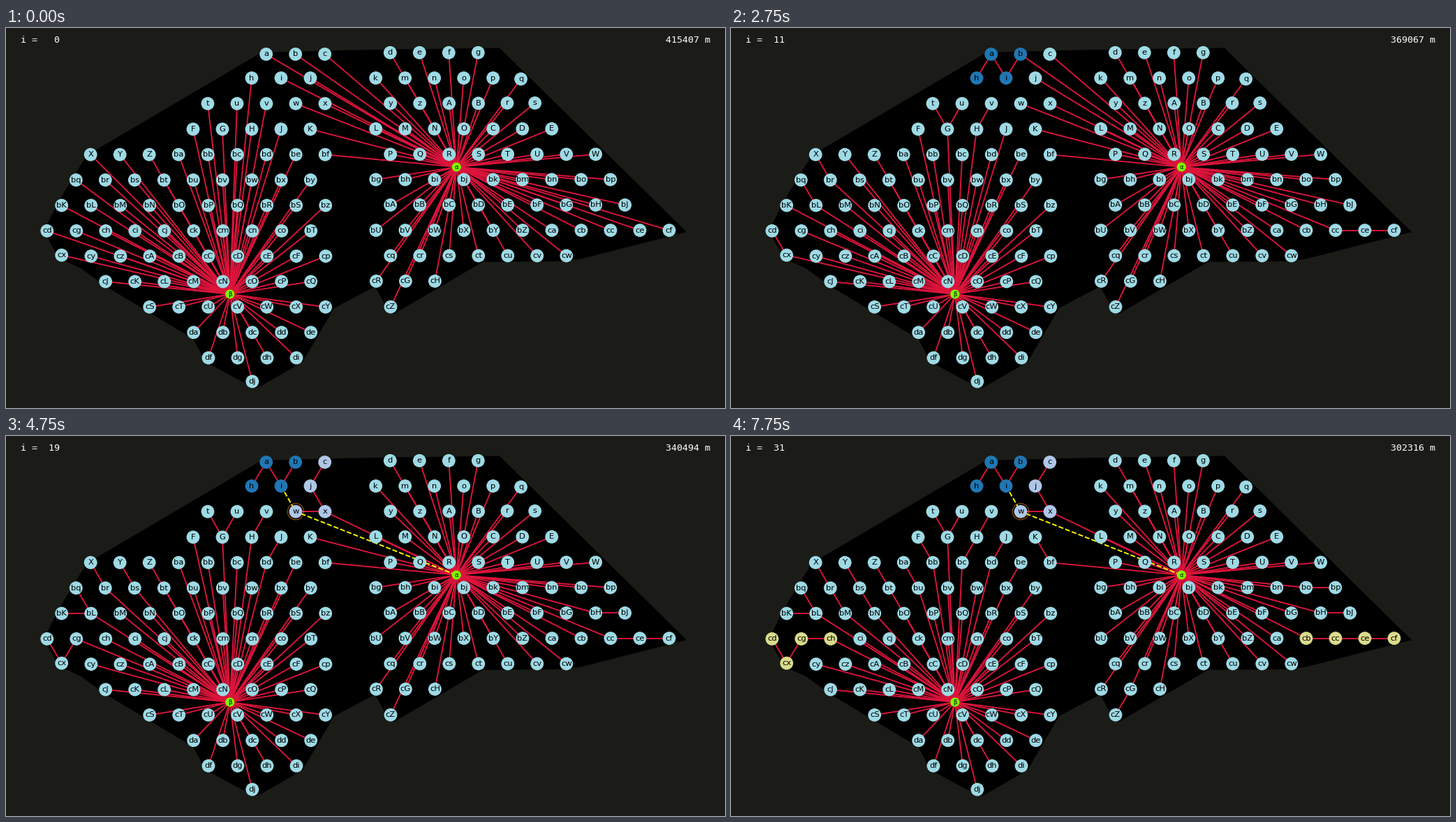
Recreate the animation shown at these times as a matplotlib script. Size 1030 px wide and 544 px high, loop 8000 ms.

```python
import math
import matplotlib.pyplot as plt
from matplotlib.animation import FuncAnimation
from matplotlib.collections import EllipseCollection, LineCollection

W, H, DPI = 1030, 544, 100
PX = 72 / DPI          # one pixel in points
STEPS, STEP_MS = 32, 250
START_LENGTH = 415407
CAPACITY = 4
PITCH = 42

# first x, y, labels of evenly spaced turbines
ROWS = [
    (372.7, 37.5, "a b c"), (550.3, 35.3, "d e f g"),
    (352, 71.6, "h i j"), (529.7, 71.6, "k m n o p"), (737.6, 73, "q"),
    (289, 108.2, "t u v w x"), (550.7, 107.8, "y z A B"),
    (718, 107.4, "r"), (757.7, 107.4, "s"),
    (268, 144.8, "F G H J K"), (529.8, 144.4, "L M N O C D E"),
    (121.2, 181.2, "X Y Z ba bb bc bd be bf"),
    (550.7, 180.8, "P Q R S T U V W"),
    (100.3, 217.6, "bq br bs bt bu bv bw bx by"),
    (529.8, 217, "bg bh bi bj bk bm bn bo bp"),
    (79.7, 254, "bK bL bM bN bO bP bQ bR bS bz"),
    (550.7, 253.4, "bA bB bC bD bE bF bG bH bJ"),
    (58.8, 290.4, "cd cg ch ci cj ck cm cn co bT"),
    (530, 289.6, "bU bV bW bX bY bZ ca cb cc ce cf"),
    (79.7, 325.2, "cx"), (121.9, 326.6, "cy cz cA cB cC cD cE cF cp"),
    (550.8, 326, "cq cr cs ct cu cv cw"),
    (142.7, 363, "cJ cK cL cM cN cO cP cQ"), (530.4, 362.4, "cR cG cH"),
    (205.7, 399.4, "cS cT cU cV cW cX cY"), (551, 399.2, "cZ"),
    (268.7, 435.8, "da db dc dd de"), (290, 472.2, "df dg dh di"),
    (352.8, 506, "dj"),
]
ROOTS = {"α": (645.3, 199), "β": (320.8, 381)}

# which turbine drops its feeder, where it connects, metres saved
MERGES = [m.split() for m in """
a i 4734; cf ce 4700; h a 4649; i b 4136; X br 4119; cd cx 4043;
ce cc 4030; v H 4028; bq bL 3976; t G 3976; u G 3949;
bK bL 3940; Y bs 3646; c j 3512; cx cg 3535; w x 3518;
J bd 3515; bJ bH 3510; j x 3397; F bb 3428; br bM 3423; cc cb 3355;
cg ch 3359; H bc 3355; Z bt 3230; cZ cG 3068;
be bx 3066; bp bo 3057; K bf 2982; ba bu 2933; bs bN 2922""".split(";")]

# first step of each detour and its path
DETOURS = [(14, "b j α"), (19, "i w α")]

OPEN_COLOR = "#9edae5"
FULL_COLORS = {"b": "#1f77b4", "x": "#aec7e8", "cb": "#dbdb8d", "ch": "#dbdb8d"}

BORDER = [(366, 35), (500, 31.5), (707, 28.5), (975, 292), (822, 331),
          (795, 334), (683, 335), (556, 409), (548, 406), (529, 370),
          (470, 401), (425, 478), (361, 515), (352, 514), (286, 478),
          (268, 445), (143, 370), (107, 344), (76, 330), (54, 291),
          (75, 249), (96, 214), (116, 182)]

pos = {}
for x0, y0, names in ROWS:
    for k, name in enumerate(names.split()):
        pos[name] = (x0 + PITCH * k, y0)
turbines = list(pos)
pos.update(ROOTS)


def nearest_root(name):
    return min(ROOTS, key=lambda r: math.dist(pos[name], pos[r]))


def network(step):
    """Parent of every turbine after the given number of merges."""
    parent = {t: nearest_root(t) for t in turbines}
    for child, to, _ in MERGES[:step]:
        parent[child] = to
    return parent


def head(name, parent):
    while parent[name] not in ROOTS:
        name = parent[name]
    return name


fig = plt.figure(figsize=(W / DPI, H / DPI), dpi=DPI, facecolor="#1b1c17")
ax = fig.add_axes([0, 0, 1, 1])
ax.set(xlim=(0, W), ylim=(H, 0))
ax.axis("off")
ax.fill(*zip(*BORDER), color="black", lw=0, zorder=0)


def discs(names, radius, z, **style):
    d = [2 * radius] * len(names)
    return ax.add_collection(EllipseCollection(
        d, d, [0] * len(names), units="xy", offsets=[pos[n] for n in names],
        transOffset=ax.transData, zorder=z, **style))


def label(name, size):
    ax.text(*pos[name], name, size=size * PX, color="black", ha="center",
            va="center", family="DejaVu Sans", zorder=5)


cables = ax.add_collection(LineCollection([], colors="crimson", lw=1.9 * PX, zorder=1))
detour, = ax.plot([], [], "--", color="yellow", lw=1.9 * PX, zorder=2)
nodes = discs(turbines, 9.4, 3, lw=0)
discs(list(ROOTS), 6.5, 4, facecolor="lawngreen", lw=0)
ring = discs(["j"], 11.6, 4, facecolor="none", edgecolor="darkorange",
             lw=1.4 * PX, alpha=0.5)
for t in turbines:
    label(t, 11.5)
for r in ROOTS:
    label(r, 8.5)

info = dict(color="white", family="DejaVu Sans Mono", size=13.33 * PX, va="top")
counter = fig.text(0.02, 0.98, "", ha="left", **info)
total = fig.text(0.98, 0.98, "", ha="right", **info)


def draw(step):
    parent = network(step)
    path = next((p.split() for s, p in reversed(DETOURS) if step >= s), None)
    cables.set_segments([(pos[c], pos[p]) for c, p in parent.items()
                         if not (path and c == "b")])

    heads = {t: head(t, parent) for t in turbines}
    sizes = list(heads.values())
    nodes.set_facecolor([
        FULL_COLORS.get(heads[t], OPEN_COLOR)
        if sizes.count(heads[t]) == CAPACITY else OPEN_COLOR
        for t in turbines])

    ring.set_visible(path is not None)
    if path:
        detour.set_data(*zip(*(pos[n] for n in path)))
        ring.set_offsets([pos[path[1]]])
    else:
        detour.set_data([], [])

    saved = sum(int(m[2]) for m in MERGES[:step])
    counter.set_text(f"i = {step:3d}")
    total.set_text(f"{START_LENGTH - saved} m")
    return cables, detour, nodes, ring, counter, total


anim = FuncAnimation(fig, draw, frames=STEPS, interval=STEP_MS, repeat=True,
                     repeat_delay=0, blit=False)
plt.show()
```
